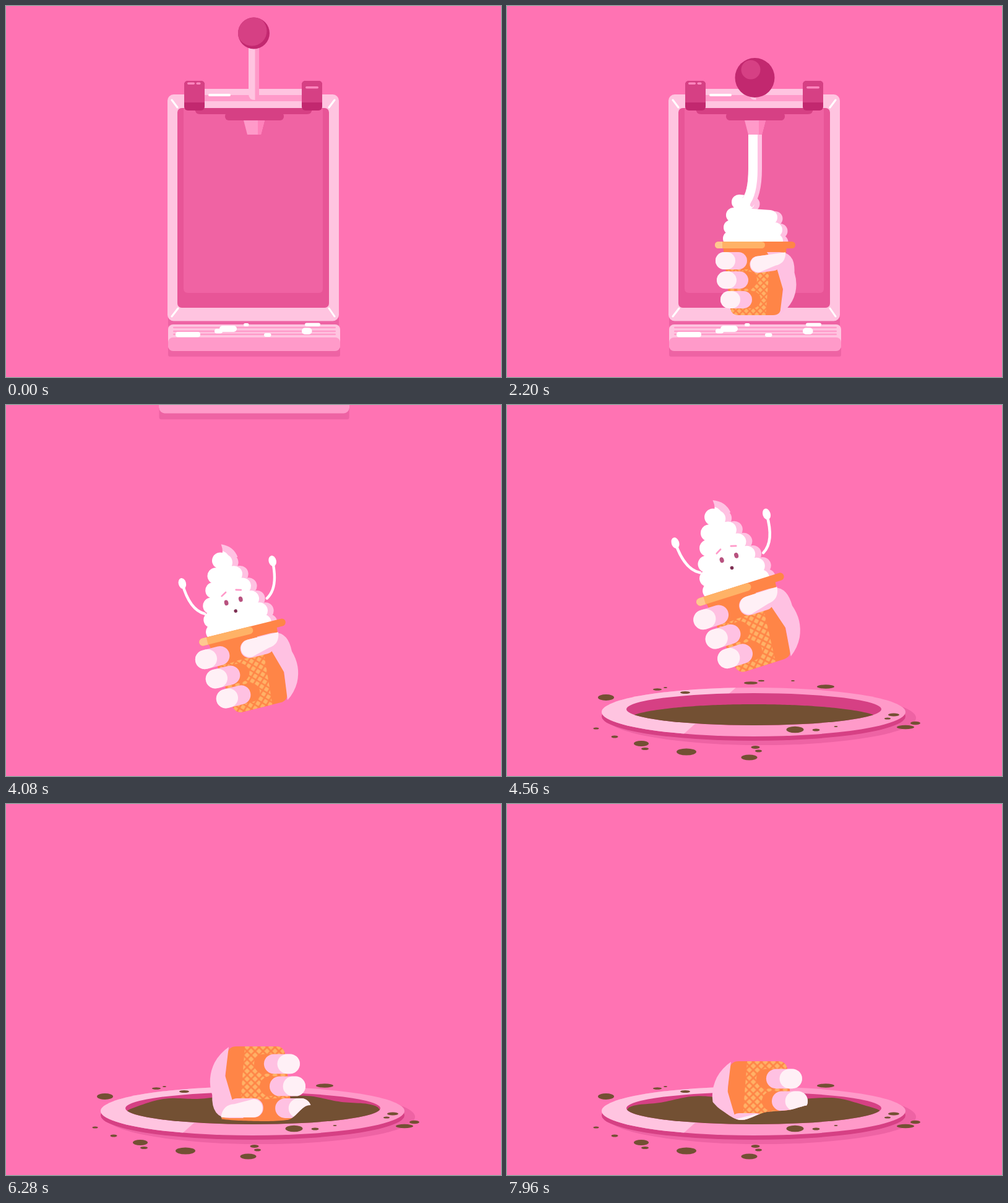
Animation, 800 px wide and 600 px high, one loop 8 s. Source, as an HTML page:

```html
<!DOCTYPE html>
<html lang="en">
<head>
<meta charset="utf-8">
<title>Soft serve</title>
<style>
html, body { margin: 0; width: 100%; height: 100%; overflow: hidden; background: #ff73b3; }
svg { display: block; width: 100%; height: 100%; }
.line { fill: none; stroke-linecap: round; stroke-linejoin: round; }
</style>
</head>
<body>
<svg id="stage" viewBox="0 0 800 600"></svg>
<script>
const C = {
  pale: '#ffc4e0', mid: '#ff9ac9', shade: '#ee63a4', deep: '#d64084', dark: '#c2286f',
  skin: '#ffc1e2', tip: '#fff0f6', orange: '#ff8547', wafer: '#ffb266', choco: '#735033'
};
const LOOP = 8000;

// ---- markup helpers ----
const box = (x1, y1, x2, y2, r, fill) =>
  `<rect x="${x1}" y="${y1}" width="${x2 - x1}" height="${y2 - y1}" rx="${r}" fill="${fill}"/>`;
const oval = (cx, cy, rx, ry, fill) =>
  `<ellipse cx="${cx}" cy="${cy}" rx="${rx}" ry="${ry}" fill="${fill}"/>`;
const shape = (d, fill, id = '') => `<path id="${id}" d="${d}" fill="${fill}"/>`;
const line = (d, color, width, id = '') =>
  `<path id="${id}" class="line" d="${d}" stroke="${color}" stroke-width="${width}"/>`;

const drips = [
  [160, 473, 13, 5], [243, 460, 7, 1.7], [256, 457, 3, 1], [288, 465, 8, 2], [394, 449.5, 11, 2.3],
  [411, 446, 5, 1.2], [462, 446, 3, 1], [515, 455.5, 14, 3.3], [144, 523, 4.5, 1.6], [174, 536.5, 5.5, 2],
  [217, 547.5, 12, 4.5], [223, 556, 6, 2], [290, 561, 16, 5.5], [391.5, 570, 13, 4.5], [401.5, 553.5, 7, 2.5],
  [406.5, 559.5, 5.5, 2], [465.5, 525, 14, 5.2], [499.5, 525.5, 6, 2], [531.5, 520, 3, 1], [625, 501, 9, 2.5],
  [615, 507, 5, 1.6], [644, 521, 14, 3.2], [660, 514.5, 8, 2.8]
];

const clip = x => box(x, 121, x + 33, 169, 6, C.dark) +
  shape(`M${x} 156V127q0-6 6-6h21q6 0 6 6v29z`, C.deep);

const machine = `
  ${box(262, 500, 538, 520, 4, C.shade)}
  ${box(262, 540, 540, 567, 3, C.shade)}
  ${box(262, 515, 540, 557, 8, C.pale)}
  ${[520, 526, 531].map(y => box(270, y - 1.3, 533, y + 1.3, 1.3, C.mid)).join('')}
  ${box(262, 536, 540, 558, 8, C.mid)}
  ${box(274, 527, 314, 535.5, 4, '#fff')}${box(345, 517, 373, 527, 5, '#fff')}
  ${box(337, 522, 350, 529.5, 3.5, '#fff')}${box(384, 513, 392.5, 518, 2.5, '#fff')}
  ${box(417, 529, 428.5, 535, 3, '#fff')}${box(483, 512.5, 508, 518, 2.7, '#fff')}
  ${box(478, 520.5, 494.5, 531, 5, '#fff')}
  ${box(296, 134, 504, 160, 4, C.pale)}
  ${box(261, 143, 538, 509.5, 10, C.pale)}
  ${box(320, 144, 480, 154, 0, C.mid)}
  ${box(327, 142, 363, 146, 2, '#fff')}
  ${box(277, 165, 522, 488, 7, '#e85597')}
  ${shape('M287 166H512V457q0 7-7 7H294q-7 0-7-7z', '#f063a3')}
  ${line('M268 152L277 164M531 152L522 164M268 502L278 489M531 502L522 489', '#fff', 3)}
  ${shape('M305 165H495q0 10-9 10H314q-9 0-9-10z', C.deep)}
  ${box(354, 172, 449, 185, 6, C.deep)}
  ${clip(288)}${clip(478)}
  ${box(293, 123.5, 305, 127, 1.7, '#ff86be')}${box(307.5, 123.5, 314.5, 127, 1.7, '#ff86be')}
  ${box(484, 130, 505, 133.5, 1.7, '#ff86be')}
  ${shape('M384 185H418L412 208H390z', C.mid)}${shape('M407 185H418L412 208H407z', '#ff82bb')}
  ${shape('', C.mid, 'rodShade')}${shape('', C.pale, 'rod')}
  <clipPath id="ballClip"><circle id="ballEdge"/></clipPath>
  <circle id="ball" fill="${C.dark}"/>
  <circle id="shine" fill="${C.deep}" clip-path="url(#ballClip)"/>`;

const plate = `
  <clipPath id="rimClip"><ellipse cx="398.5" cy="496.5" rx="245.5" ry="39.5"/></clipPath>
  <clipPath id="holeClip"><ellipse cx="399" cy="492" rx="206" ry="26"/></clipPath>
  ${oval(411, 506, 250, 44, C.shade)}
  ${oval(398.5, 503.5, 245.5, 39.5, C.deep)}
  ${oval(398.5, 496.5, 245.5, 39.5, C.mid)}
  <path d="M140 440H389L262 553H140z" fill="${C.pale}" clip-path="url(#rimClip)"/>
  ${oval(399, 492, 206, 26, C.deep)}
  <path id="choco" fill="${C.choco}" clip-path="url(#holeClip)"/>
  ${drips.map(d => oval(...d, C.choco)).join('')}`;

const eyes = y => oval(388.7, y, 3, 4, '#b8527f') + oval(410.3, y, 3, 4, '#b8527f');
const face = `<g id="face">
  <g id="laugh">
    ${line('M384 330.5Q388 327.500 392 329.500M406 329.500Q410 327.500 414 330.500', C.mid, 2)}
    ${line('M384.500 340Q388 336 391.500 340M406 340Q409.500 336 413 340', '#c9487f', 2)}
    ${shape('M391 350H407Q407 358 399 358T391 350z', '#7d2f52')}
    ${oval(399, 356, 4, 1.8, '#d64f85')}
  </g>
  <g id="worry">
    ${line('M384.500 328L391.500 324M407 324L414 326', C.mid, 2.4)}${eyes(339)}
    ${oval(399, 354, 2.5, 2.5, '#7d2f52')}
  </g>
  <g id="fear">
    ${line('M385 326.500L392 324.500M407 324.500L414 326.500', C.mid, 2)}${eyes(339)}
    ${shape('M391.500 360Q391.500 352 400 352T408 360Q400 358 391.500 360z', '#8d3158')}
  </g></g>`;

// Each finger is a capsule with a bright tip and a plain shadow on the cone.
const fingers = [[324, 412], [332, 443.3], [340, 475]];
const finger = ([x, y], i) => `<g id="finger${i}">
  ${box(x + 25, y - 14, x + 65, y + 14, 14, C.orange)}
  ${box(x, y - 14, x + 51, y + 14, 14, C.skin)}${box(x, y - 14, x + 32, y + 14, 14, C.tip)}</g>`;

const arm = id => `<g id="${id}">${line('', '#fff', 4, id + 'Line')}
  <ellipse id="${id}Hand" rx="5.5" ry="8" fill="#fff"/></g>`;

const cone = `
  <pattern id="waffle" width="8" height="8" patternUnits="userSpaceOnUse" patternTransform="translate(2 1) rotate(45)">
    ${box(0, 0, 8, 8, 0, C.orange)}${box(1.2, 1.2, 6.8, 6.800, .6, C.wafer)}</pattern>
  ${arm('armL')}<g transform="translate(802 0) scale(-1 1)">${arm('armR')}</g>
  <g transform="translate(8.500 2)">${line('', C.skin, 24, 'creamShade')}</g>
  <g id="peak">${shape('M402 254Q419 261 421 278L394 280Q404 267 402 254z', C.skin)}
    ${shape('M402 264Q410 270 409 280H388Q399 272 402 264z', '#fff')}</g>
  ${line('', '#fff', 24, 'cream')}
  <g id="stream" fill="none">
    <path id="flowShade" stroke="${C.skin}" stroke-width="22"/>
    <g transform="translate(-3.500 0)"><path id="flow" stroke="#fff" stroke-width="15"/>
      <circle id="drop" r="9" fill="#fff"/></g></g>
  ${face}
  ${shape('M349 388H452L443 488Q442 500 430 500H374Q363 500 361 489z', C.orange)}
  ${shape('M356 425H424L418 500H374Q363 500 361 489z', 'url(#waffle)')}
  ${box(336, 381, 466, 392, 5.5, C.orange)}
  ${box(336, 381, 417, 392, 5.5, C.wafer)}
  ${shape('M348 381H341.500a5.500 5.500 0 0 0 0 11H348z', '#ffc890')}
  ${fingers.map(finger).join('')}
  ${shape('M420 398H440Q466 398 464.500 431Q472 455 461 477Q454 490 441 499L446 458L436 424z', C.skin)}
  <g id="thumb">${box(392, 399, 442, 426, 13, C.skin)}
    ${shape('M406 399H452Q450 417 433 418L406 425A13 13 0 0 1 406 399z', C.tip)}</g>`;

document.getElementById('stage').innerHTML = `
  <rect width="800" height="600" fill="#ff73b3"/>
  <g id="machine">${machine}</g><g id="plate">${plate}</g>
  <clipPath id="surface"><path id="surfaceEdge"/></clipPath>
  <g id="dip"><g id="cone">${cone}</g></g>`;

// ---- motion helpers ----
const nodes = {};
document.querySelectorAll('[id]').forEach(n => nodes[n.id] = n);
const set = (id, attrs) => { for (const k in attrs) nodes[id].setAttribute(k, attrs[k]); };
const show = (id, on) => set(id, { visibility: on ? 'inherit' : 'hidden' });
const clamp = v => Math.max(0, Math.min(1, v));
const mix = (a, b, u) => a + (b - a) * u;

// Monotone cubic through [position, value] keys, held at both ends.
function track(keys, t) {
  const last = keys.length - 1;
  if (t <= keys[0][0]) return keys[0][1];
  if (t >= keys[last][0]) return keys[last][1];
  const slope = i => (keys[i + 1][1] - keys[i][1]) / (keys[i + 1][0] - keys[i][0]);
  const tangent = i => {
    if (i === 0 || i === last) return 0;
    const a = slope(i - 1), b = slope(i);
    return a * b <= 0 ? 0 : 2 * a * b / (a + b);
  };
  let i = 0;
  while (t > keys[i + 1][0]) i++;
  const [t0, a] = keys[i], [t1, b] = keys[i + 1], h = t1 - t0, u = (t - t0) / h, v = 1 - u;
  return a * (1 + 2 * u) * v * v + b * u * u * (3 - 2 * u) + h * u * v * (tangent(i) * v - tangent(i + 1) * u);
}

const coneX = [[60, 800], [680, 401], [3400, 401], [4080, 382], [5060, 370], [5440, 304.7], [5860, 402], [6280, 405.5], [7960, 407.5]];
const coneY = [[60, 720], [680, 386.5], [3400, 386.5], [4080, 367.5], [5040, 240], [5440, 314], [5860, 472], [5920, 489], [6280, 521], [6900, 554], [7600, 513], [7960, 545], [8280, 560]];
const coneTurn = [[60, 40], [680, 0], [3400, 0], [4080, -14], [5040, -22], [5440, -90], [5860, -180]];

// Cream rows from the bottom up: left end, right end, height.
const rows = [[361, 434, 376], [362, 433, 358], [366, 425, 338], [375, 418, 317], [383, 410, 297], [395, 400, 277]];
const POUR = 920, ROW_TIME = 380, POUR_END = 3200;

function drawLever(t) {
  const p = track([[120, 0], [620, 1], [3040, 1], [3900, 0]], t);
  const y = mix(44, 116, p), r = mix(25.5, 32, p), x = 400.5;
  set('ball', { cx: x, cy: y, r });
  set('ballEdge', { cx: x, cy: y, r });
  set('shine', { cx: mix(397.5, 394, p), cy: y - mix(3.5, 13, p), r: mix(24, 15.5, p) });
  set('rod', { d: `M392 ${y}H402.500V152Q392 152 392 142z` });
  set('rodShade', { d: `M402 ${y}H409V146H402z` });
}

function drawCream(t) {
  const done = (t - POUR) / ROW_TIME, current = Math.floor(done);
  let d = '', endX = 401, endY = 208 + 168 * Math.pow(clamp((t - 720) / 200), 1.5);
  rows.forEach(([left, right, y], i) => {
    if (i > current) return;
    const u = i < current ? 1 : (1 - Math.cos(Math.PI * (done - i))) / 2;
    const from = i % 2 ? left : right, to = mix(from, i % 2 ? right : left, u);
    const tilt = x => y + 4 * (x - left) / (right - left);
    d += `M${from} ${tilt(from)}L${to} ${tilt(to)}`;
    endX = to;
    endY = tilt(to);
  });
  set('cream', { d });
  set('creamShade', { d });
  show('peak', t > 3300);
  show('stream', t > 720 && t < 3360);
  const top = 208 + 62 * clamp((t - POUR_END) / 160);
  const flow = `M401 ${top}V${Math.max(top, endY - 55)}Q401 ${endY - 14} ${endX} ${endY}`;
  set('flow', { d: flow });
  set('flowShade', { d: flow });
  set('drop', { cx: endX, cy: endY });
}

function drawCharacter(t) {
  show('face', t > 2700);
  show('laugh', t < 3560);
  show('worry', t >= 3560 && t < 5000);
  show('fear', t >= 5000);
  set('face', { transform: `translate(0 ${track([[4900, 0], [5400, 12]], t)})` });

  const spread = track([[5040, 0], [5400, 1], [5500, 1], [5860, .35]], t);
  const grow = track([[2640, 0], [2960, 1]], t);
  const hx = mix(333, 284, spread), hy = mix(296, 361, spread);
  const d = `M354 ${mix(347, 351, spread)}Q${mix(334, 325, spread)} ${mix(336, 363, spread)} ${hx} ${hy}`;
  for (const id of ['armL', 'armR']) {
    set(id + 'Line', { d });
    set(id + 'Hand', { transform: `translate(${hx} ${hy}) rotate(${-78 * spread})` });
    set(id, { transform: `translate(362 349) scale(${grow}) translate(-362 -349)` });
  }
}

function drawHand(t) {
  const grip = track([[560, -1.7], [860, .6], [1160, 1], [2560, 1], [3100, 0]], t);
  [13, 7, 5].forEach((reach, i) => set('finger' + i, { transform: `translate(${grip * reach} 0)` }));
  set('thumb', { transform: `rotate(${-8 * grip} 446 412)` });
}

function drawChocolate(t, y) {
  const lift = track([[5700, 0], [6040, 1]], t);
  let top = 'M190 540';
  for (let x = 193; x <= 605; x += 4) {
    const arch = 26 * Math.sqrt(Math.max(0, 1 - ((x - 399) / 206) ** 2));
    const wave = 2.5 * Math.sin(x * .055 + t * .006);
    top += `L${x} ${492 - arch + 18 - lift * (12 + wave)}`;
  }
  set('choco', { d: top + 'L608 540z' });

  // The front of the pool hides whatever has sunk into it.
  const w = clamp((y - 521) / 24);
  const front = [[320, 495, 474], [345, 509, 494], [378, 512, 511], [420, 513, 498], [455, 511, 495], [490, 487, 487]]
    .map(([x, high, low]) => [x, mix(high, low, w)]);
  let edge = 'M0 0V495';
  for (let x = 300; x <= 500; x += 4) edge += `L${x} ${track(front, x)}`;
  set('surfaceEdge', { d: edge + 'H800V0z' });
  set('dip', { 'clip-path': t > 5500 ? 'url(#surface)' : 'none' });
}

function draw(t) {
  const u = clamp((t - 3400) / 1120);
  const pan = u < .5 ? 4 * u ** 3 : 1 - 4 * (1 - u) ** 3;
  const zoom = 1 + .138 * pan, y = track(coneY, t);
  const camera = (shift, scale) => `translate(400 ${300 + shift}) scale(${scale}) translate(-400 -300)`;
  set('machine', { transform: camera(-753 * pan, zoom) });
  set('plate', { transform: camera(753 * (1 - pan), zoom / 1.138) });
  show('machine', pan < 1);
  show('plate', pan > 0);
  set('cone', {
    transform: `translate(${track(coneX, t)} ${y}) rotate(${track(coneTurn, t)}) scale(${zoom}) translate(-401 -386.5)`
  });
  drawLever(t);
  drawCream(t);
  drawCharacter(t);
  drawHand(t);
  drawChocolate(t, y);
}

const start = performance.now();
function tick() {
  draw((performance.now() - start) % LOOP);
  requestAnimationFrame(tick);
}
tick();
</script>
</body>
</html>
```
